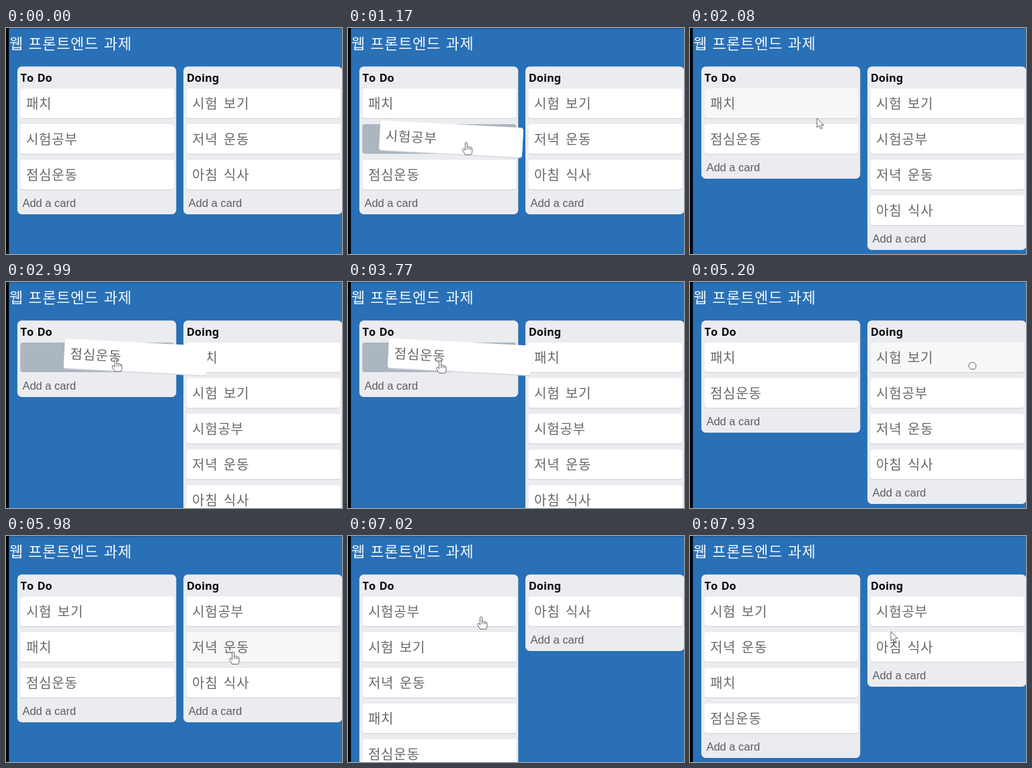
Recreate the animation shown at these times as an HTML page. Size 500x336 px, loop 8000 ms.

```html
<!DOCTYPE html>
<html lang="ko">
<head>
<meta charset="utf-8">
<title>Board</title>
<style>
  html, body { margin: 0; width: 100%; height: 100%; overflow: hidden; background: #2970b6; }
  svg { display: block; width: 500px; height: 336px; }
  text { white-space: pre; }
  .title { font: 22px "Noto Sans CJK KR", "Noto Sans CJK", sans-serif; letter-spacing: .7px; word-spacing: .6px; fill: #f4f8fc; }
  .card { font: 20px "Noto Sans CJK KR", "Noto Sans CJK", sans-serif; letter-spacing: .8px; word-spacing: 2px; fill: #6a6a6a; }
  .head { font: bold 16.4px "Noto Sans", "Open Sans", sans-serif; font-kerning: none; word-spacing: 1px; fill: #0b0b0d; }
  .add { font: 16.5px "Liberation Sans", Arial, sans-serif; fill: #5c5e62; }
</style>
</head>
<body>
<svg viewBox="0 0 500 336">
  <rect width="500" height="336" fill="#2970b6"/>
  <rect width="500" height="1.3" fill="#235a91"/>
  <rect width="4.3" height="336" fill="#000"/>
  <text class="title" x="4.9" y="30.5">웹 프론트엔드 과제</text>
  <g id="board"></g>
  <g id="held"></g>
  <g id="cursor" stroke="#555" stroke-width=".9" stroke-linejoin="round" fill="#fff"></g>
</svg>
<script>
const LOOP = 8000, STEP = 130;
const CARD_W = 229, CARD_H = 44, HELD_W = 213, PITCH = 53, TOP = 90;
const columns = [{ name: "To Do", x: 16.9 }, { name: "Doing", x: 264 }];
const startLists = [["패치", "시험공부", "점심운동"], ["시험 보기", "저녁 운동", "아침 식사"]];

// One entry per drag: card, pick-up time, drop time, target column and index
const drags = [
  ["시험공부", 1040, 1690, 1, 1],
  ["패치", 2210, 2600, 1, 0],
  ["점심운동", 2860, 3250, 1, 0],
  ["점심운동", 3380, 3900, 0, 0],
  ["패치", 4160, 4680, 0, 0],
  ["시험 보기", 5200, 5590, 0, 0],
  ["저녁 운동", 6110, 6370, 0, 1],
  ["시험공부", 6630, 6890, 0, 0],
  ["시험공부", 7410, 7800, 1, 0]
].map(([card, grab, drop, column, index]) => ({ card, grab, drop, column, index }));

// Pointer path: time, x, y
const path = [
  [260, 330, 262], [780, 150, 170], [1040, 150, 170], [1690, 398, 168],
  [2080, 189, 134], [2210, 165, 122], [2600, 412, 116],
  [2860, 98, 115], [3250, 350, 113], [3380, 345.5, 118],
  [3770, 137, 117], [3900, 100, 116], [4160, 360, 115], [4680, 112, 113],
  [5200, 420, 124], [5590, 170, 118], [5980, 338, 172], [6110, 334, 171],
  [6370, 90, 172], [6630, 385, 118], [6890, 190, 121], [7020, 198, 120],
  [7410, 198, 120], [7800, 440, 119], [7930, 299, 142]
];

const cursors = {
  arrow: `<path d="M0 0V14L3.3 11 5.5 16 7.8 15 5.6 10.2H10Z"/>`,
  hand: `<path d="M-1.5 1Q0-1 1.5 1V7Q3 5.5 4.3 7.3 5.8 6.3 6.8 8 9 7.5 9 10V14Q9 16 7.5 18.5H-1.5L-5 12.5Q-6.2 10-4.5 9.5-3 9.5-1.5 12Z"/>
         <path d="M1.5 7V11M4.3 8V11M6.8 8.5V11" fill="none"/>`,
  grab: `<path d="M-4.5-2Q-4-4.5-2-4 0-5.5 1.3-4.2 3-4.5 3.6-3 5.5-3 5.5-.5V2Q5 4 3.5 5.5H-2.5L-5.5 1.5Q-6-.5-4.5-.5Z"/>`
};

const cardX = column => columns[column].x + 4.4;
const rowY = row => TOP + PITCH * row;
const box = (x, y, w, h, r, fill) =>
  `<rect x="${x}" y="${y}" width="${w}" height="${h}" rx="${r}" fill="${fill}"/>`;
const label = (cls, x, y, text) => `<text class="${cls}" x="${x}" y="${y}">${text}</text>`;

function pointerAt(t) {
  if (t < path[0][0]) return null;
  const next = path.findIndex(point => point[0] > t);
  if (next < 0) return path[path.length - 1].slice(1);
  const [t0, x0, y0] = path[next - 1], [t1, x1, y1] = path[next];
  const u = (t - t0) / (t1 - t0), k = u * u * (3 - 2 * u);
  return [x0 + (x1 - x0) * k, y0 + (y1 - y0) * k];
}

function locate(lists, card) {
  const column = lists[0].includes(card) ? 0 : 1;
  return { column, row: lists[column].indexOf(card) };
}

function place(lists, { card, column, index }) {
  const from = locate(lists, card);
  lists[from.column].splice(from.row, 1);
  lists[column].splice(index, 0, card);
}

function stateAt(t) {
  const lists = startLists.map(list => [...list]);
  const pointer = pointerAt(t);
  let held = null, dropped = null;
  for (const drag of drags) {
    if (t >= drag.drop) {
      place(lists, drag);
      dropped = drag.card;
    } else if (t > drag.grab) {
      const home = locate(lists, drag.card), [gx, gy] = pointerAt(drag.grab);
      held = {
        card: drag.card,
        x: pointer[0] - gx + cardX(home.column),
        y: pointer[1] - gy + rowY(home.row)
      };
      if ((pointer[0] > 258 ? 1 : 0) === drag.column) place(lists, drag);
    }
  }
  return { lists, pointer, held, dropped };
}

function cardUnder(lists, pointer, inset) {
  if (!pointer) return null;
  const [x, y] = pointer;
  const column = x > 258 ? 1 : 0, row = Math.floor((y - TOP) / PITCH);
  const dx = x - cardX(column), dy = y - rowY(row);
  const inside = dx >= 0 && dx <= CARD_W && dy <= CARD_H - inset;
  return inside ? lists[column][row] : null;
}

function cardSvg(x, y, w, text, fill) {
  return box(x, y + 1.3, w, CARD_H, 4, "#d3d5da") + box(x, y, w, CARD_H, 4, fill) +
    label("card", x + 8.6, y + 29.5, text);
}

function columnSvg(column, list, heldCard, hovered) {
  const { name, x } = columns[column];
  const bottom = rowY(list.length) + 28;
  const cards = list.map((card, row) => card === heldCard
    ? box(cardX(column), rowY(row), CARD_W, CARD_H, 4, "#abb6c0")
    : cardSvg(cardX(column), rowY(row), CARD_W, card, card === hovered ? "#f6f8f8" : "#fff"));
  return box(x, 57.3, 236.4, bottom - 57.3, 6.5, "#ebecf0") +
    label("head", x + 4.7, 80, name) + cards.join("") +
    label("add", x + 7.5, bottom - 11, "Add a card");
}

const [board, heldLayer, cursorLayer] =
  ["board", "held", "cursor"].map(id => document.getElementById(id));

function draw(t) {
  const { lists, pointer, held, dropped } = stateAt(t);
  const under = held ? null : cardUnder(lists, pointer, 0);
  const hovered = under === dropped ? null : under;
  board.innerHTML = lists
    .map((list, column) => columnSvg(column, list, held && held.card, hovered)).join("");

  heldLayer.innerHTML = held
    ? `<g transform="rotate(3 ${held.x + HELD_W / 2} ${held.y + CARD_H / 2})">` +
      cardSvg(held.x, held.y, HELD_W, held.card, "#fff") + "</g>"
    : "";

  if (!pointer) {
    cursorLayer.innerHTML = "";
    return;
  }
  // The closed hand shows at pick-up, once the card has taken its hover tint
  const grabbing = hovered && drags.some(drag => drag.grab === t);
  const kind = grabbing ? "grab" : held || cardUnder(lists, pointer, 1) ? "hand" : "arrow";
  cursorLayer.innerHTML = cursors[kind];
  cursorLayer.setAttribute("transform", `translate(${pointer[0]} ${pointer[1]})`);
}

const begin = performance.now();
let shown = -1;
function frame() {
  const t = Math.floor((performance.now() - begin) % LOOP / STEP) * STEP;
  if (t !== shown) draw(shown = t);
  requestAnimationFrame(frame);
}
frame();
</script>
</body>
</html>
```
